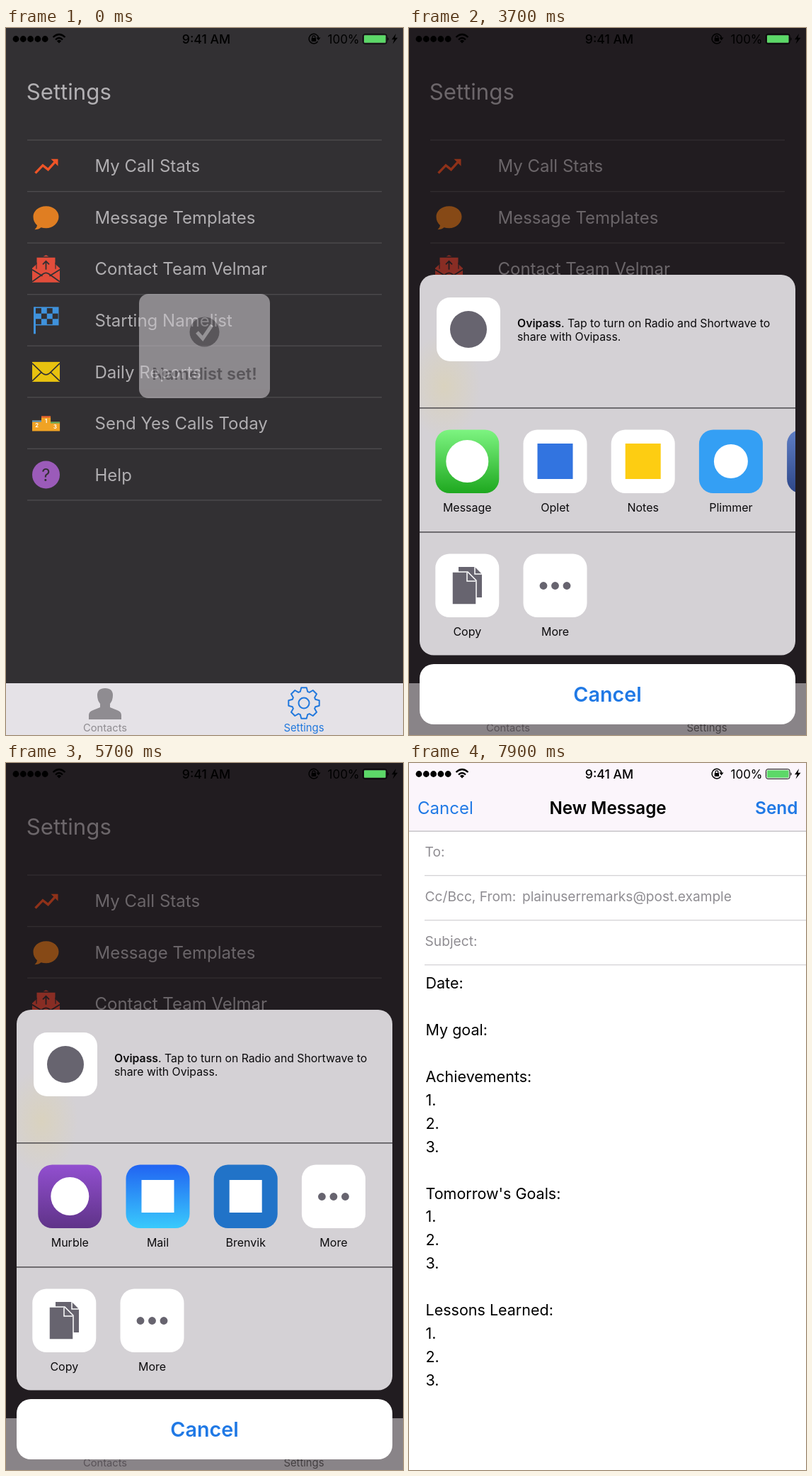
Recreate the animation shown at these times as an HTML page. Size 561 by 997 pixels, loop 8 s.

```html
<!DOCTYPE html>
<html lang="en">
<head>
<meta charset="utf-8">
<style>
html, body { margin: 0; width: 100%; height: 100%; overflow: hidden; background: #323033; }
svg { display: block; width: 100vw; height: 100vh; font-family: Inter, Roboto, sans-serif; }
text { white-space: pre; }
</style>
</head>
<body>
<svg id="stage" viewBox="0 0 561 997">
  <defs>
    <linearGradient id="green" x2="0" y2="1"><stop stop-color="#7df481"/><stop offset="1" stop-color="#1ea81f"/></linearGradient>
    <linearGradient id="navy" x2="0" y2="1"><stop stop-color="#5f7fc6"/><stop offset="1" stop-color="#2d4688"/></linearGradient>
    <linearGradient id="violet" x2="0" y2="1"><stop stop-color="#924fd0"/><stop offset="1" stop-color="#5f3388"/></linearGradient>
    <linearGradient id="azure" x2="0" y2="1"><stop stop-color="#2163f2"/><stop offset="1" stop-color="#39cafc"/></linearGradient>
    <linearGradient id="glow" x2="0" y2="1"><stop stop-color="#fff" stop-opacity="0"/><stop offset="1" stop-color="#fff" stop-opacity=".75"/></linearGradient>
    <radialGradient id="warm"><stop stop-color="#e2d49a" stop-opacity=".38"/><stop offset="1" stop-color="#e2d49a" stop-opacity="0"/></radialGradient>
    <clipPath id="panel"><rect x="15" y="348" width="531" height="536.5" rx="20"/></clipPath>
  </defs>
  <g id="home"></g>
  <g id="hud"></g>
  <rect id="dim" width="561" height="997" fill="#0a0006"/>
  <g id="sheet"></g>
  <g id="mail"></g>
  <g id="status"></g>
</svg>
<script>
const $ = id => document.getElementById(id);
const BG = '#323033', BLUE = '#2079e5', GREY = '#67646f';

const text = (x, y, size, fill, str, extra = '') =>
  `<text x="${x}" y="${y}" font-size="${size}" fill="${fill}" ${extra}>${str}</text>`;
const mid = 'text-anchor="middle"', semi = 'font-weight="600"';
const rect = (x, y, w, h, fill, r = 0) =>
  `<rect x="${x}" y="${y}" width="${w}" height="${h}" rx="${r}" fill="${fill}"/>`;
const disc = (x, y, r, fill, extra = '') => `<circle cx="${x}" cy="${y}" r="${r}" fill="${fill}" ${extra}/>`;
const path = (d, fill, extra = '') => `<path d="${d}" fill="${fill}" ${extra}/>`;
const line = (d, color, w, extra = '') => path(d, 'none', `stroke="${color}" stroke-width="${w}" ${extra}`);
const dots = (x, y, n, gap, r, fill) =>
  Array.from({length: n}, (_, i) => disc(x + i * gap, y, r, fill)).join('');

// Settings screen; row icons are drawn around (0, 0)
function flag() {
  let s = rect(-17.5, -19, 3, 38, '#3f92dc') + rect(-16, -19, 34, 26, '#3f92dc');
  for (let r = 0; r < 3; r++)
    for (let c = 0; c < 4; c++)
      if ((r + c) % 2 === 0) s += rect(-14.5 + c * 7.9, -17.3 + r * 7.6, 7.9, 7.6, BG);
  return s;
}
function podium() {
  const step = (x, y, cap, n) => rect(x, y, 13.1, 11 - y, '#f0a324') + rect(x, y, 13, 2, cap) +
    text(x + 6.5, y + 9.5, 7.5, '#fff', n, `${mid} font-weight="700"`);
  return step(-19.5, -4, '#4a90c8', 2) + step(-6.5, -10, '#e2562f', 1) + step(6.5, -2, '#55a860', 3);
}
const rows = [
  ['My Call Stats', line('M-15 10L-4.5-1L3 5L13-6', '#ee5427', 3.4) + path('M7-10H17V0Z', '#ee5427')],
  ['Message Templates', path('M.3-16C10-16 18-9.5 18-1S10 15 .3 15Q-4 15-7 14Q-10 17-16 17Q-12.5 14-12.5 11Q-18 6-18-1C-18-9.5-10-16 .3-16Z', '#e07e22')],
  ['Contact Team Velmar', path('M-19.5-1L-13-7V-16H13V-7L19.5-1V19H-19.5ZM-4-17.5L0-19.5L4-17.5Z', '#e24d3b') +
    line('M-13.5-9V0M13.5-9V0', BG, 1.2) +
    line('M-19.5 1L-5 10M19.5 1L5 10M-19.5 18L-4 7Q0 4 4 7L19.5 18', BG, 1.8) +
    line('M0 1V-11M-4.5-6.5L0-11L4.5-6.5', BG, 1.8)],
  ['Starting Namelist', flag()],
  ['Daily Reports', rect(-19.5, -14, 39, 28, '#e8c20f') +
    line('M-19.5-12L-5 2Q0 6 5 2L19.5-12M-19.5 13L-7 1M19.5 13L7 1', BG, 1.6)],
  ['Send Yes Calls Today', podium()],
  ['Help', disc(0, 0, 19.5, '#9b5bb9') + text(0, 8.5, 24, BG, '?', mid)]
];

function gear(cx, cy) {
  let d = '';
  for (let i = 0; i < 8; i++)
    [[-.31, 17], [-.17, 22], [.17, 22], [.31, 17]].forEach(([a, r], k) => {
      const q = i * Math.PI / 4 + a;
      d += `${i + k ? 'L' : 'M'}${(cx + r * Math.sin(q)).toFixed(1)} ${(cy - r * Math.cos(q)).toFixed(1)}`;
    });
  return line(d + 'Z', '#2178dd', 2, 'stroke-linejoin="round"') +
    disc(cx, cy, 7.5, 'none', 'stroke="#2178dd" stroke-width="2"');
}

let home = rect(0, 0, 561, 997, BG) + text(28.7, 100.8, 31.2, '#b2b0b3', 'Settings');
for (let i = 0; i < 8; i++) home += rect(30, 157.4 + i * 72.55, 501, 1.3, '#4e4c4f');
rows.forEach(([label, icon], i) => {
  const y = 194.7 + i * 72.55;
  home += `<g id="icon${i}" transform="translate(56.5 ${y})">${icon}</g>
    <g id="label${i}" transform="translate(127 ${y})">${text(-1.5, 8.6, 24, '#b0aeb1', label)}</g>`;
});
home += rect(0, 924, 561, 73, '#e5e2e7') +
  path('M117 975V969Q117 964 123 962L133 958V953Q129 948 129 941Q129 931 140 931T151 941Q151 948 147 953V958L157 962Q163 964 163 969V975Z', '#8f8c91') +
  text(140, 991.5, 14.7, '#8f8c91', 'Contacts', mid) +
  `<g id="tab">${gear(421, 952)}${text(421, 991.5, 14.8, '#2178dd', 'Settings', mid)}</g>`;
$('home').innerHTML = home;

$('hud').innerHTML = rect(188, 375, 185, 147, '#c8c4c9', 13) + disc(280.5, 428.5, 21, '#747075') +
  line('M270 429L278 438L291 419', '#d8d5d9', 5) +
  text(280.5, 496, 23.5, '#747075', 'Namelist set!', `${mid} ${semi}`);

// Share sheet
const tile = (x, y, fill, label, art) =>
  rect(x - 45, y, 90, 89.5, fill, 20) + art + text(x, y + 115, 16, '#0c0b0d', label, mid);
const more = (x, y) => dots(x - 16.5, y + 45, 3, 16.5, 5.4, GREY);
const apps = [
  ['Message', 'url(#green)', x => disc(x, 611, 30, '#fff')],
  ['Oplet', '#fff', x => rect(x - 25, 586, 50, 50, '#3274e0')],
  ['Notes', '#fff', x => rect(x - 25, 586, 50, 50, '#fdcd12')],
  ['Plimmer', '#349ff4', x => disc(x, 611, 24, '#fff')],
  ['Frostine', 'url(#navy)', () => ''],
  ['Murble', 'url(#violet)', x => disc(x, 611, 27, '#fff')],
  ['Mail', 'url(#azure)', x => rect(x - 23, 588, 46, 46, '#fff')],
  ['Brenvik', '#2173c8', x => rect(x - 23, 588, 46, 46, '#fff')],
  ['More', '#fff', x => more(x, 566.5)]
];
const brand = `<tspan ${semi}>Ovipass</tspan>`;
const para = (x, y, fill, lines) => lines.map((s, i) => text(x, y + i * 19.6, 15.8, fill, s)).join('');
const copyIcon = path('M70 760H93L103 770V803H70Z', GREY) + line('M93 760V770H103', '#fff', 1.5) +
  path('M61 767H83L95 779V813H61Z', GREY, 'stroke="#fff" stroke-width="1.5"') + line('M82 768V780H94', '#fff', 1.5);

$('sheet').innerHTML = `<g clip-path="url(#panel)">
  ${rect(15, 348, 531, 537, '#d4d1d5')}
  <g id="backdrop">${rect(0, 890, 561, 107, 'url(#glow)')}<ellipse cx="50" cy="505" rx="52" ry="75" fill="url(#warm)"/></g>
  ${rect(39, 380, 90, 90, '#fff', 19)}${disc(84, 425, 26, GREY)}
  <g id="before">${rect(39, 380, 90, 90, '#e6e5ea', 19)}${disc(84, 425, 38, '#5a9fe0')}
  ${para(150, 401.5, '#807d82', [brand + '. Share instantly with people nearby. If',
    'they turn on Ovipass from the Side Panel on', "it or from a Folder on the desk, you'll see their", 'names here. Just tap to share.'])}</g>
  <g id="after">${para(153, 421.5, '#0c0b0d', [brand + '. Tap to turn on Radio and Shortwave to', 'share with Ovipass.'])}</g>
  <g id="apps">${apps.map(([label, fill, art], i) => {
    const x = 82.3 + i * 124.2;
    return tile(x, 566.5, fill, label, art(x));
  }).join('')}</g>
  ${rect(15, 535.2, 531, 1.4, '#454346')}${rect(15, 710.2, 531, 1.4, '#454346')}
  ${tile(82.3, 741.5, '#fff', 'Copy', copyIcon)}${tile(206.5, 741.5, '#fff', 'More', more(206.5, 741.5))}
  </g>${rect(15, 897, 531, 85, '#fff', 20)}${text(280.5, 950, 28.7, BLUE, 'Cancel', `${mid} ${semi}`)}`;

// Mail composer
const list = ['1.', '2.', '3.'];
const body = ['Date:', '', 'My goal:', '', 'Achievements:', ...list, '', "Tomorrow's Goals:", ...list, '', 'Lessons Learned:', ...list];
$('mail').innerHTML = rect(0, 0, 561, 997, '#fff') + rect(0, 0, 561, 96, '#fbf5fb') + rect(0, 95.5, 561, 1.4, '#c4c1c5') +
  text(12, 71.5, 24, BLUE, 'Cancel') + text(281, 71.5, 24.2, '#000', 'New Message', `${mid} ${semi}`) +
  text(549.5, 71.5, 24.4, BLUE, 'Send', `text-anchor="end" ${semi}`) +
  [158, 221, 284].map(y => rect(22, y, 539, 1.3, '#d5d3d6')).join('') +
  text(22.5, 132, 19.2, '#8f8d92', 'To:') + text(22.5, 194.7, 19.2, '#8f8d92', 'Cc/Bcc, From:') +
  text(160, 194.7, 19.1, '#8f8d92', 'plainuserremarks@post.example') + text(22.5, 257.5, 19.2, '#8f8d92', 'Subject:') +
  body.map((s, i) => text(23.5, 318.4 + i * 32.9, 21.5, '#000', s)).join('');

// Status bar stays above everything
$('status').innerHTML = dots(14, 15.5, 5, 10.3, 4.4, '#000') +
  line('M66.5 13Q75 5 83.5 13M70 16.5Q75 11.5 80 16.5', '#000', 2.3) + path('M71.8 18.3Q75 15.3 78.2 18.3L75 21.5Z', '#000') +
  text(283, 21.5, 17.7, '#000', '9:41 AM', `${mid} font-weight="500"`) +
  line('M440.5 19A6.8 6.8 0 1 1 441.6 14', '#000', 1.5) + path('M438.5 13.5H444.5L441.5 17.5Z', '#000') +
  rect(431.7, 14, 6.4, 5, '#000', .8) + line('M433 14V12.5Q433 10.8 434.9 10.8T436.8 12.5V14', '#000', 1.2) +
  text(454.5, 21.5, 17, '#000', '100%') +
  '<rect x="504.5" y="8.7" width="33.5" height="13.6" rx="2.5" fill="none" stroke="#000"/>' +
  rect(506, 10.2, 30.5, 10.6, '#5cd868', 1) + path('M539.3 13Q542 15.5 539.3 18Z', '#000') +
  path('M551 8L545 16.3H548.6L546.5 22.5L553.5 13.8H549.6Z', '#000');

const ramp = (t, start, len) => Math.min(1, Math.max(0, (t - start) / len));
const easeOut = p => 1 - (1 - p) ** 3;
const smooth = p => p * p * (3 - 2 * p);
const move = (id, value) => $(id).setAttribute('transform', value);
const fade = (id, value) => $(id).setAttribute('opacity', value);

function draw(now) {
  const t = Math.floor(now / 100) * 100 % 8000;   // ten pictures a second

  fade('hud', .6 * (1 - ramp(t, 0, 300)));

  const press = smooth(ramp(t, 2000, 300)) * (1 - ramp(t, 2800, 400));
  move('icon4', `translate(${56.5 - 13 * press} 484.9) scale(${1 + .1 * press})`);
  move('label4', `translate(${127 - 4 * press} 484.9) scale(${1 + .126 * press})`);

  const shown = easeOut(ramp(t, 2350, 442)) * (1 - smooth(ramp(t, 6600, 450)));
  const drop = 649 * (1 - shown);
  move('sheet', `translate(0 ${drop})`);
  move('backdrop', `translate(0 ${-drop})`);
  fade('dim', .42 * shown);
  $('tab').style.filter = `saturate(${1 - shown})`;

  const swap = ramp(t, 2350, 250);
  fade('before', 1 - swap ** 4);
  fade('after', swap);

  move('apps', `translate(${-613 * easeOut(ramp(t, 4200, 1287))} 0)`);
  move('mail', `translate(0 ${997 * (1 - easeOut(ramp(t, 7350, 500)))})`);
  requestAnimationFrame(tick);
}
const begin = performance.now();
const tick = () => draw(performance.now() - begin);
tick();
</script>
</body>
</html>
```
